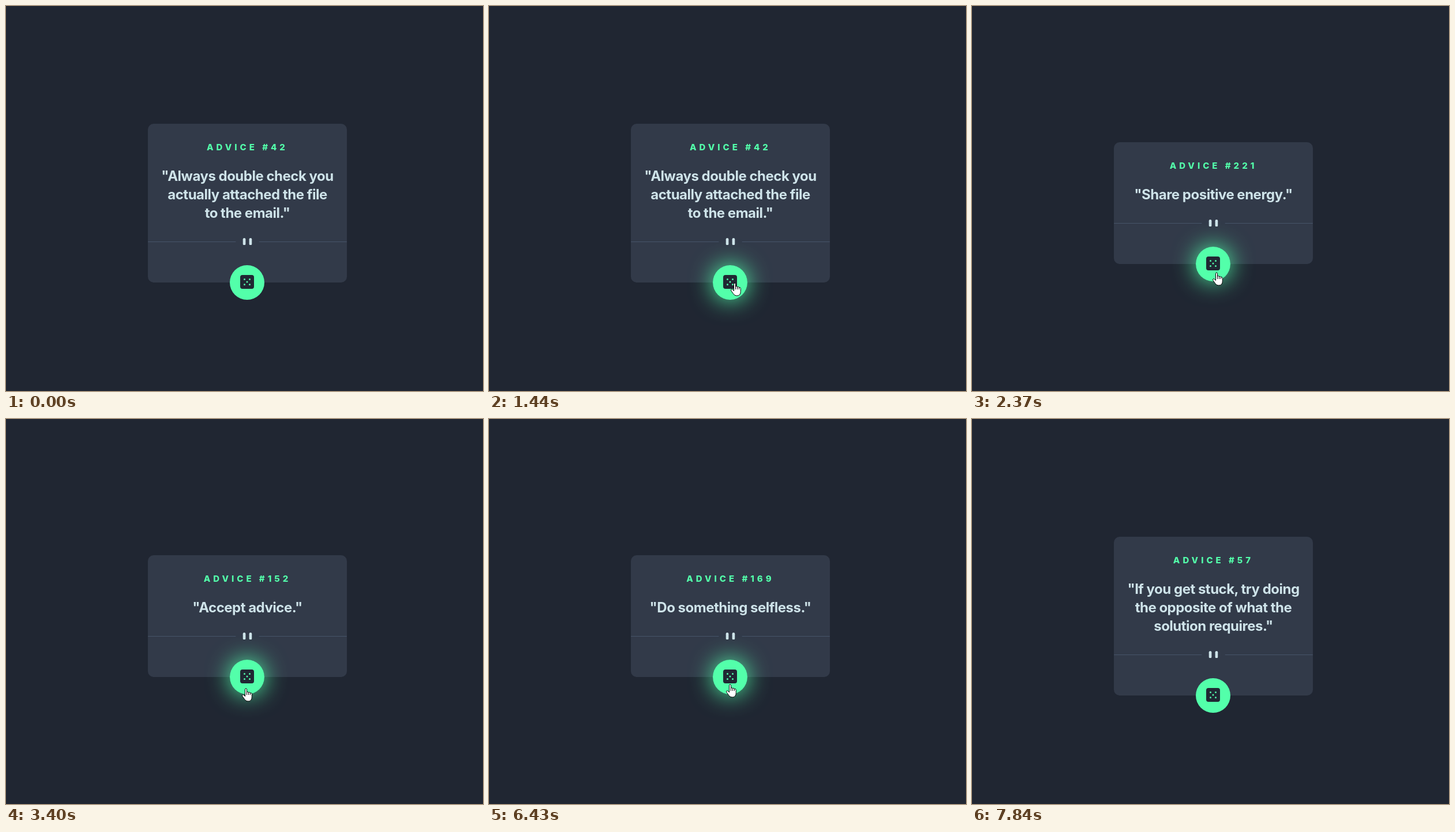
Write an HTML page that moves like this. It is 827 px wide and 667 px high and loops after 9.1 s.

```html
<!DOCTYPE html>
<html lang="en">
<head>
<meta charset="utf-8">
<title>Advice generator</title>
<style>
  html, body { margin: 0; width: 100%; height: 100%; overflow: hidden; background: #202632; }
  .scene {
    --n: 0; --inset: 0px; --hover: 0; --press: 0;
    position: relative; width: 827px; height: 667px; overflow: hidden;
    font-family: Inter, "Open Sans", sans-serif;
    animation: slides 9.1s step-end infinite, hover 9.1s step-end infinite, press 9.1s step-end infinite;
  }
  .scene * { position: absolute; margin: 0; }
  .card {
    left: 246px; top: calc(204px + var(--inset));
    width: 345px; height: calc(275px - 2 * var(--inset));
    border-radius: 10px; background: #323a49;
  }
  .slide {
    inset: 0; text-align: center; white-space: nowrap;
    opacity: calc(1 - (var(--n) - var(--i)) * (var(--n) - var(--i)));
  }
  .slide br { position: static; }
  h1 { left: 0; right: 0; top: 31px; font-size: 15px; line-height: 20px; font-weight: 800; letter-spacing: 5px; color: #53ffaa; }
  p { left: 0; right: 0; top: 75px; font-size: 24px; line-height: 32px; font-weight: 700; letter-spacing: -.5px; color: #cee3e9; }
  .rule { left: 0; bottom: 64.57px; width: 345px; height: 12.43px; }
  .dice { left: 142px; bottom: -30px; width: 60px; height: 60px; border-radius: 50%; background: #53ffaa; }
  .glow { inset: 0; border-radius: 50%; box-shadow: 0 0 40px #53ffaa; opacity: var(--hover); }
  .dice svg { left: 18px; top: 17px; }

  .mouse { left: 0; top: 0; animation: move 9.1s step-end infinite, seen 9.1s step-end infinite; }
  .mouse svg { overflow: visible; fill: #fff; stroke: #000; }
  .ring { left: -12px; top: -12px; width: 24px; height: 24px; border-radius: 50%; background: rgba(255, 255, 0, .47); opacity: var(--press); }
  .arrow { opacity: calc(1 - var(--hover)); }
  .hand { left: -6px; opacity: var(--hover); }

  @keyframes slides {
    0% { --n: 0; --inset: 0px; }
    18.132% { --n: 1; --inset: 32px; }
    37.363% { --n: 2; --inset: 32px; }
    56.154% { --n: 3; --inset: 32px; }
    73.077%, 100% { --n: 4; --inset: 0px; }
  }
  @keyframes hover {
    0% { --hover: 0; }
    9.011% { --hover: 1; }
    18.132% { --hover: 0; }
    23.956% { --hover: 1; }
    81.648%, 100% { --hover: 0; }
  }
  @keyframes press {
    0%, 15.824%, 34.945%, 53.956%, 70.659%, 100% { --press: 0; }
    14.176%, 33.407%, 52.637%, 69.451% { --press: 1; }
  }
  @keyframes seen {
    0% { opacity: 0; }
    3.626% { opacity: 1; }
    86.154%, 100% { opacity: 0; }
  }
  @keyframes move {
    0% { transform: translate(729px, 662px); }
    3.626% { transform: translate(729px, 662px); animation-timing-function: steps(4, jump-start); }
    6.703% { transform: translate(481px, 514px); animation-timing-function: steps(5, jump-start); }
    10.549% { transform: translate(425px, 479px); }
    23.956% { transform: translate(425px, 479px); animation-timing-function: steps(4, jump-start); }
    26.74% { transform: translate(423px, 461px); }
    32.637% { transform: translate(423px, 461px); animation-timing-function: steps(3, jump-start); }
    34.945% { transform: translate(415px, 466px); }
    42.967% { transform: translate(415px, 466px); animation-timing-function: steps(4, jump-start); }
    45.897% { transform: translate(417px, 459px); }
    80.11% { transform: translate(417px, 459px); animation-timing-function: steps(3, jump-start); }
    82.418% { transform: translate(462px, 490px); animation-timing-function: steps(5, jump-start); }
    86.264%, 100% { transform: translate(750px, 655px); }
  }
</style>
</head>
<body>
<div class="scene">
  <div class="card">
    <div class="slide" style="--i: 0"><h1>ADVICE #42</h1><p>"Always double check you<br>actually attached the file<br>to the email."</p></div>
    <div class="slide" style="--i: 1"><h1>ADVICE #221</h1><p>"Share positive energy."</p></div>
    <div class="slide" style="--i: 2"><h1>ADVICE #152</h1><p>"Accept advice."</p></div>
    <div class="slide" style="--i: 3"><h1>ADVICE #169</h1><p>"Do something selfless."</p></div>
    <div class="slide" style="--i: 4"><h1>ADVICE #57</h1><p>"If you get stuck, try doing<br>the opposite of what the<br>solution requires."</p></div>
    <svg class="rule" viewBox="0 0 444 16">
      <path fill="#4f5d74" d="M0 8h196v1H0zM248 8h196v1H248z"/>
      <g fill="#cee3e9"><rect x="212" width="6" height="16" rx="3"/><rect x="226" width="6" height="16" rx="3"/></g>
    </svg>
    <div class="dice">
      <div class="glow"></div>
      <svg width="24" height="24">
        <rect width="24" height="24" rx="4" fill="#202733"/>
        <g fill="#53ffaa">
          <circle cx="7.5" cy="7.5" r="1.5"/><circle cx="16.5" cy="7.5" r="1.5"/><circle cx="12" cy="12" r="1.5"/>
          <circle cx="7.5" cy="16.5" r="1.5"/><circle cx="16.5" cy="16.5" r="1.5"/>
        </g>
      </svg>
    </div>
  </div>
  <div class="mouse">
    <div class="ring"></div>
    <svg class="arrow" width="12" height="19"><path d="M.5 1v15.5l3.6-3.5 2.4 5.4 2.5-1.1-2.4-5.3h5z"/></svg>
    <svg class="hand" width="18" height="24">
      <path d="M5.5 2.5a1.5 1.5 0 0 1 3 0V7q1.7-1 3 .6 1.7-.8 2.9.8 2.9-.2 2.9 2v5q0 7.6-6.6 7.6-4 0-6-3.4L1 14.6q-1-2.2.3-2.8t2.7 1l1.5 1.7z"/>
      <path fill="none" d="M8.500 7v5M11.500 7.500V12M14.400 8.500V12"/>
    </svg>
  </div>
</div>
</body>
</html>
```
